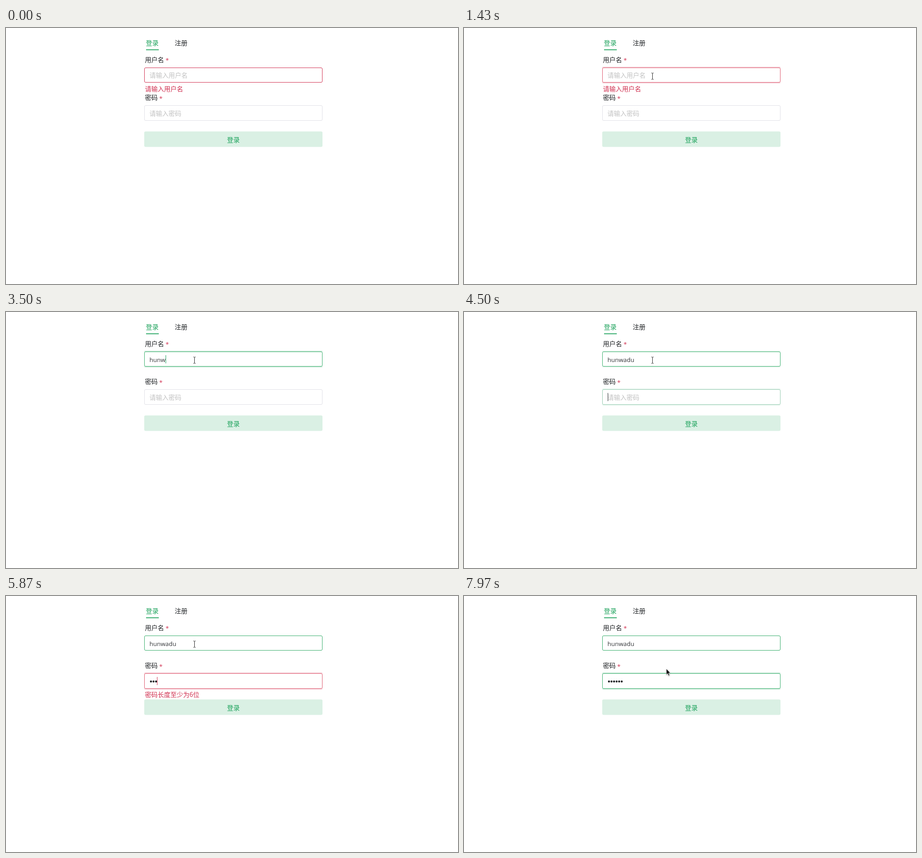
An HTML page that plays this animation: 994x563 px, repeating every 8000 ms.

```html
<!DOCTYPE html>
<html lang="zh-CN">
<head>
<meta charset="utf-8">
<style>
html, body { margin: 0; width: 100%; height: 100%; overflow: hidden; background: #fff; }
svg { display: block; }
text { font: 350 14px "Noto Sans CJK SC", "Noto Sans CJK", sans-serif; fill: #1f2225; white-space: pre; }
.green { fill: #18a058; }
.red { fill: #d03050; }
.hint { fill: #c2c2c2; }
.star { font: 13px "Open Sans", sans-serif; fill: #d03050; }
#name { font: 13.4px "Open Sans", sans-serif; fill: #333639; }
.field { fill: #fff; }
.ring { fill: none; stroke-width: 2; }
</style>
</head>
<body>
<svg width="994" height="563" viewBox="0 0 994 563">
  <clipPath id="pane"><rect x="304" y="60" width="392" height="210"/></clipPath>

  <text class="green" x="307.5" y="38.3">登录</text>
  <text x="371" y="38.3">注册</text>
  <rect class="green" x="308" y="47" width="28" height="1.7"/>

  <text x="305.5" y="74.8">用户名</text>
  <text class="star" x="351" y="76">*</text>
  <text x="305.5" y="158.3">密码</text>
  <text class="star" x="337" y="159.5">*</text>

  <g clip-path="url(#pane)">
    <rect class="ring" id="ring1" x="303" y="86" width="394" height="35" rx="4"/>
    <rect class="ring" id="ring2" x="303" y="169" width="394" height="36" rx="4"/>
  </g>
  <rect class="field" id="field1" x="304.5" y="87.5" width="391" height="32" rx="2.5"/>
  <rect class="field" id="field2" x="304.5" y="170.5" width="391" height="33" rx="2.5"/>

  <text class="hint" id="hint1" x="315.5" y="109.2">请输入用户名</text>
  <text class="hint" id="hint2" x="315.5" y="192.6">请输入密码</text>
  <text id="name" x="315.5" y="109.5"></text>
  <g id="dots" fill="#1f2225"></g>
  <rect id="caret" width="1" height="18"/>

  <text class="red" id="error1" x="305.5" y="138.5">请输入用户名</text>
  <text class="red" id="error2" x="305.5" y="222">密码长度至少为6位</text>

  <rect x="304" y="227.5" width="392" height="34" rx="3" fill="#daf0e4"/>
  <text class="green" x="500" y="250.6" text-anchor="middle">登录</text>

  <path id="arrow" d="M0 0V13.2L2.9 10.5L5 15.4L7.2 14.4L5.1 9.6H9Z" fill="#111" stroke="#fff" stroke-width=".8"
        style="filter:drop-shadow(0 1px 1px #0005)"/>
  <path id="beam" d="M-2.5-7H-.8L0-6.2L.8-7H2.5M0-6.2V6.2M-2.5 7H-.8L0 6.2L.8 7H2.5" fill="none" stroke="#222"/>
</svg>
<script>
const LOOP = 8000, FADE = 300;
const GREY = [224, 224, 230], GREEN = [24, 160, 88], LIGHT_GREEN = [54, 173, 106],
      RED = [208, 48, 80], LIGHT_RED = [222, 87, 109], INK = [51, 54, 57];
const USER = "hunwadu";
const userKeys = [2700, 2900, 3170, 3500, 3830, 4030, 4090];
const passKeys = [4740, 5400, 5870, 6270, 6870, 7070];
const blinks = [1430, 1960, 2510, 2700, 4360, 4360, 5270, 5400, 6800, 6870, 7630];
// time, x, y of the mouse; it jumps from one stop to the next
const mouse = [
  [130, 920, 556], [200, 803, 497], [270, 720, 440], [330, 643, 378],
  [400, 572, 295], [470, 525, 225], [540, 495, 178], [610, 472, 147],
  [680, 446, 124], [750, 429, 114], [820, 419, 108], [890, 414.5, 106],
  [7830, 418, 112], [7900, 430, 134], [7970, 445, 160]
];

const el = id => document.getElementById(id);
const set = (id, attrs) => { for (const k in attrs) el(id).setAttribute(k, attrs[k]); };
const show = (id, on) => set(id, { visibility: on ? "visible" : "hidden" });
const count = (times, t) => times.filter(k => k <= t).length;
const ease = (t, start) => {
  const p = Math.min(1, Math.max(0, (t - start) / FADE));
  return p * p * (3 - 2 * p);
};
const rgb = c => `rgb(${c.map(Math.round)})`;

// fades through a list of [start time, colour]
const blend = (t, first, ...stops) => rgb(stops.reduce(
  (c, [start, next]) => c.map((v, i) => v + (next[i] - v) * ease(t, start)), first));

for (let i = 0; i < passKeys.length; i++) {
  const dot = document.createElementNS("http://www.w3.org/2000/svg", "circle");
  dot.setAttribute("cx", 318.8 + 5.6 * i);
  dot.setAttribute("cy", 188);
  dot.setAttribute("r", 2.2);
  el("dots").append(dot);
}

function feedback(id, amount) {
  set(id, { opacity: amount, transform: `translate(0 ${-4 * (1 - amount)})` });
}

function draw(t) {
  const typed = count(userKeys, t), dots = count(passKeys, t), second = t >= 4360;

  set("field1", { stroke: blend(t, RED, [750, LIGHT_RED], [2700, LIGHT_GREEN], [7900, GREEN]) });
  set("field2", { stroke: blend(t, GREY, [4360, LIGHT_GREEN], [4740, LIGHT_RED], [7070, LIGHT_GREEN]) });
  set("ring1", { stroke: blend(t, RED, [2700, GREEN]), "stroke-opacity": .2 * (ease(t, 1020) - ease(t, 4360)) });
  set("ring2", { stroke: blend(t, GREEN, [4740, RED], [7070, GREEN]), "stroke-opacity": .2 * ease(t, 4360) });
  feedback("error1", 1 - ease(t, 2700));
  feedback("error2", ease(t, 4740) - ease(t, 7070));

  show("hint1", !typed);
  show("hint2", !dots);
  el("name").textContent = USER.slice(0, typed);
  [...el("dots").children].forEach((dot, i) => dot.setAttribute("visibility", i < dots ? "visible" : "hidden"));

  const width = second ? 5.6 * dots : typed && el("name").getComputedTextLength();
  show("caret", t >= 1020 && count(blinks, t) % 2 === 0);
  set("caret", {
    x: Math.floor(316 + width), y: second ? 178 : 95,
    fill: second ? blend(t, INK, [4500, GREEN], [4740, RED], [7070, GREEN]) : blend(t, RED, [2700, GREEN])
  });

  const stop = mouse.filter(m => m[0] <= t).pop();
  const [, x, y] = stop || [0, 0, 0];
  const overField = y > 87 && y < 120;
  show("arrow", stop && !overField);
  show("beam", stop && overField);
  for (const id of ["arrow", "beam"]) set(id, { transform: `translate(${x} ${y})` });
}

const start = performance.now();
function tick() {
  draw((performance.now() - start) % LOOP);
  requestAnimationFrame(tick);
}
tick();
</script>
</body>
</html>
```
